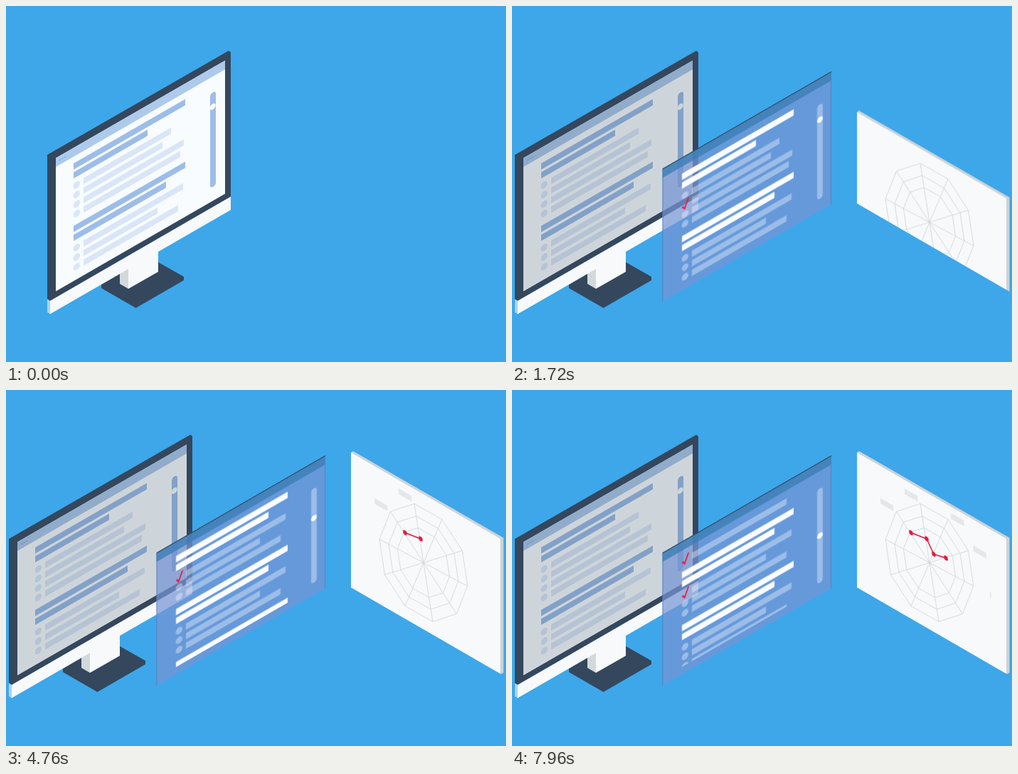
An HTML page that plays this animation: 703x501 px, repeating every 8 s.

```html
<!DOCTYPE html>
<html lang="en">
<head>
<meta charset="utf-8">
<title>Survey to radar chart</title>
<style>
  html, body { margin: 0; width: 100%; height: 100%; overflow: hidden; background: #3da7ea; }
  svg { display: block; width: 100%; height: 100%; }

  .frame { fill: #34475d; }
  .paper { fill: #f8fcfe; }
  .case { fill: #f7f9fa; }
  .title { fill: #9dbde8; }
  .option { fill: #dae6f7; }
  #panel .title { fill: #fbfcfe; }
  #panel .option { fill: rgba(255, 255, 255, .35); }
  .check { fill: none; stroke: #e8173c; stroke-width: 2; stroke-dasharray: 1 2; }
  .link { fill: none; stroke: #e8173c; stroke-width: 1.5; stroke-dasharray: 1 2; }
  .dot { fill: #e8173c; }
  .label { fill: #e5e8ea; }
  .web { fill: none; stroke: #d0d4d7; stroke-width: .8; }

  #monitor, #panel, #dim, #rows, #knob, #card {
    animation: 8s cubic-bezier(.33, 0, .67, 1) infinite;
  }
  #monitor { animation-name: monitor; }
  #panel { animation-name: panel, fade; animation-timing-function: cubic-bezier(.33, 0, .67, 1), linear; }
  #dim { animation-name: fade; }
  #rows { animation-name: rows; }
  #knob { animation-name: knob; }
  #card { animation-name: card; }

  @keyframes monitor {
    0%, 2% { transform: translateX(0); }
    8%, 100% { transform: translateX(-54px); }
  }
  @keyframes panel {
    0%, 2% { transform: translate(-141.5px, -15px); }
    8%, 100% { transform: translate(0, 0); }
  }
  @keyframes fade {
    0%, 2% { opacity: 0; }
    8%, 100% { opacity: 1; }
  }
  @keyframes rows {
    0%, 32% { transform: translateY(0); }
    37%, 57.5% { transform: translateY(-52px); }
    62.5%, 88% { transform: translateY(-159px); }
    93.5%, 100% { transform: translateY(-291px); }
  }
  @keyframes knob {
    0%, 32% { transform: translateY(0); }
    37%, 57.5% { transform: translateY(14.5px); }
    62.5%, 88% { transform: translateY(30.5px); }
    93.5%, 100% { transform: translateY(45px); }
  }
  @keyframes card {
    0%, 19% { transform: translateY(196px); }
    23%, 100% { transform: translateY(0); }
  }
</style>
</head>
<body>
<svg viewBox="0 0 703 501" preserveAspectRatio="none">
  <defs>
    <clipPath id="view"><rect x="20" y="20.5" width="180" height="156.5"/></clipPath>
    <clipPath id="floor"><path d="M480 0H703V403.9L480 275.1Z"/></clipPath>
  </defs>

  <g id="monitor">
    <path class="frame" d="M134 392L190 359L213 360L250 381V386L182.500 425L134 397Z"/>
    <path fill="#d3d8dc" d="M160 375L172 369V398L160 391Z"/>
    <path class="case" d="M172 369L214 344V374L172 398Z"/>
    <path class="frame" d="M58 209.500L313 63L316 65V268.500L62 415L58 412.500Z"/>
    <path class="case" d="M62 415L316 268.300V287L62 433.500Z"/>
    <path fill="#a9d4f0" d="M58 412.500L62 415V433.500L58 431Z"/>
    <g transform="matrix(1 -.577 0 1 70 214)">
      <rect class="paper" width="238" height="187.500"/>
      <rect fill="#aecaeb" width="238" height="12.500"/>
      <g fill="#86a9dc">
        <circle cx="6" cy="6" r="1"/><circle cx="9.500" cy="6" r="1"/><circle cx="13" cy="6" r="1"/>
      </g>
      <g id="page"></g>
      <rect class="title" x="217" y="35" width="8" height="133" rx="4"/>
      <circle class="paper" cx="220.800" cy="55" r="4"/>
      <rect id="dim" width="238" height="187.500" fill="rgba(0,24,42,.17)"/>
    </g>
  </g>

  <g id="panel">
    <g transform="matrix(1 -.577 0 1 211.500 229)">
      <rect width="237.500" height="187" fill="rgba(118,149,212,.72)"/>
      <rect width="237.500" height="13" fill="#3d7fb5" fill-opacity=".8"/>
      <path fill="none" stroke="#34506f" stroke-width="1.400" d="M0 .5H237.500"/>
      <path fill="none" stroke="#4a78b4" stroke-opacity=".7" d="M.5 0V187M237 13V187"/>
      <g clip-path="url(#view)"><g id="rows"></g></g>
      <rect class="option" x="217.500" y="37" width="8" height="133" rx="4"/>
      <circle id="knob" class="title" cx="221.500" cy="58.800" r="4"/>
    </g>
  </g>

  <g clip-path="url(#floor)">
    <g id="card">
      <path fill="#cdd3d7" d="M485 88L488 86L699.500 208V398L695 400Z"/>
      <path fill="#f7f9fb" d="M485 88L695 209.200V400L485 278.500Z"/>
      <g id="web" class="web" transform="translate(587 243)"></g>
      <g id="labels"></g>
      <g id="links"></g>
      <g id="dots"></g>
    </g>
  </g>
</svg>

<script>
const LOOP = 8000;
const byId = id => document.getElementById(id);
const css = [];

function add(parent, tag, attrs) {
  const el = document.createElementNS('http://www.w3.org/2000/svg', tag);
  for (const k in attrs) el.setAttribute(k, attrs[k]);
  return parent.appendChild(el);
}

// Change one property from a to b at a given time, holding until the loop restarts
function reveal(el, start, length, prop, a, b) {
  const name = 'reveal' + css.length;
  const at = ms => ms / LOOP * 100 + '%';
  css.push(`@keyframes ${name} {
    0%, ${at(start)} { ${prop}: ${a}; }
    ${at(start + length)}, 100% { ${prop}: ${b}; }
  }`);
  el.style.animation = `${name} 8s cubic-bezier(.33, 0, .67, 1) infinite`;
}

const draw = (el, start, length) => reveal(el, start, length, 'stroke-dashoffset', 1.01, 0);

// One question: two title lines and its options; a check replaces the chosen bullet
function question(parent, y, second, ends, pick, start) {
  const bar = (cls, x, top, end) =>
    add(parent, 'rect', { class: cls, x, y: top, width: end - x, height: 8.7 });
  bar('title', 25, y, 182);
  bar('title', 25, y + 12.5, second);
  ends.forEach((end, i) => {
    const top = y + 28.5 + i * 13.4;
    bar('option', 39, top, end);
    const bullet = add(parent, 'circle', { class: 'option', cx: 29.3, cy: top + 4.2, r: 4.7 });
    if (i !== pick) return;
    const check = add(parent, 'path', {
      class: 'check', pathLength: 1,
      d: `M25.500 ${top + 5}l3.300 4.300l5.300 -12.500`
    });
    draw(check, start, 240);
    reveal(bullet, start, 240, 'opacity', 1, 0);
  });
}

function form(parent, count, picks = []) {
  for (let i = 0; i < count; i++) {
    const [pick, start] = picks[i] || [];
    if (i === 0) question(parent, 22, 129, [162, 150, 180, 175], pick, start);
    else question(parent, 110 + (i - 1) * 74.5, 155, [179, 143, 172], pick, start);
  }
}

form(byId('page'), 2);
const sheet = add(byId('rows'), 'g', { transform: 'translate(2.500 .8)' });
form(sheet, 6, [[1, 1080], [0, 3320], [1, 5240], [2, 5720], [0, 7640]]);

// Radar web: half of the corners, the rest mirrored through the centre
const half = [[-13, -83], [26, -61], [54.5, -17], [62, 33], [46.5, 72]];
const corners = half.concat(half.map(([x, y]) => [-x, -y]));
for (const k of [1, .79, .59]) {
  add(byId('web'), 'polygon', { points: corners.map(([x, y]) => [x * k, y * k]).join(' ') });
}
for (const [x, y] of half) add(byId('web'), 'path', { d: `M${x} ${y}L${-x} ${-y}` });

// start, dot x, dot y, label x, label y, label width
const answers = [
  [2080, 561, 200.8, 518, 152, 18.5],
  [3880, 583, 209.5, 552, 138.5, 18.5],
  [6320, 593, 231, 617, 173, 18.5],
  [6600, 610, 236.5, 648.5, 218.8, 18.5],
  [7920, 615, 241.5, 672, 284, 3]
];
answers.forEach(([start, x, y, lx, ly, width], i) => {
  const room = LOOP - start;
  const spot = add(byId('labels'), 'g', { transform: `matrix(1 .577 0 1 ${lx} ${ly})` });
  const label = add(spot, 'rect', { class: 'label', width, height: 8 });
  reveal(label, start, Math.min(200, room), 'transform', 'scaleX(0)', 'scaleX(1)');
  if (i) {
    const [, px, py] = answers[i - 1];
    const link = add(byId('links'), 'path', { class: 'link', pathLength: 1, d: `M${px} ${py}L${x} ${y}` });
    draw(link, start, Math.min(240, room));
  }
  if (room < 280) return;
  const place = add(byId('dots'), 'g', { transform: `matrix(.866 .5 0 1 ${x} ${y})` });
  const dot = add(place, 'circle', { class: 'dot', r: 3.2 });
  reveal(dot, start + 160, 120, 'transform', 'scale(0)', 'scale(1)');
});

document.head.appendChild(document.createElement('style')).textContent = css.join('\n');
</script>
</body>
</html>
```
